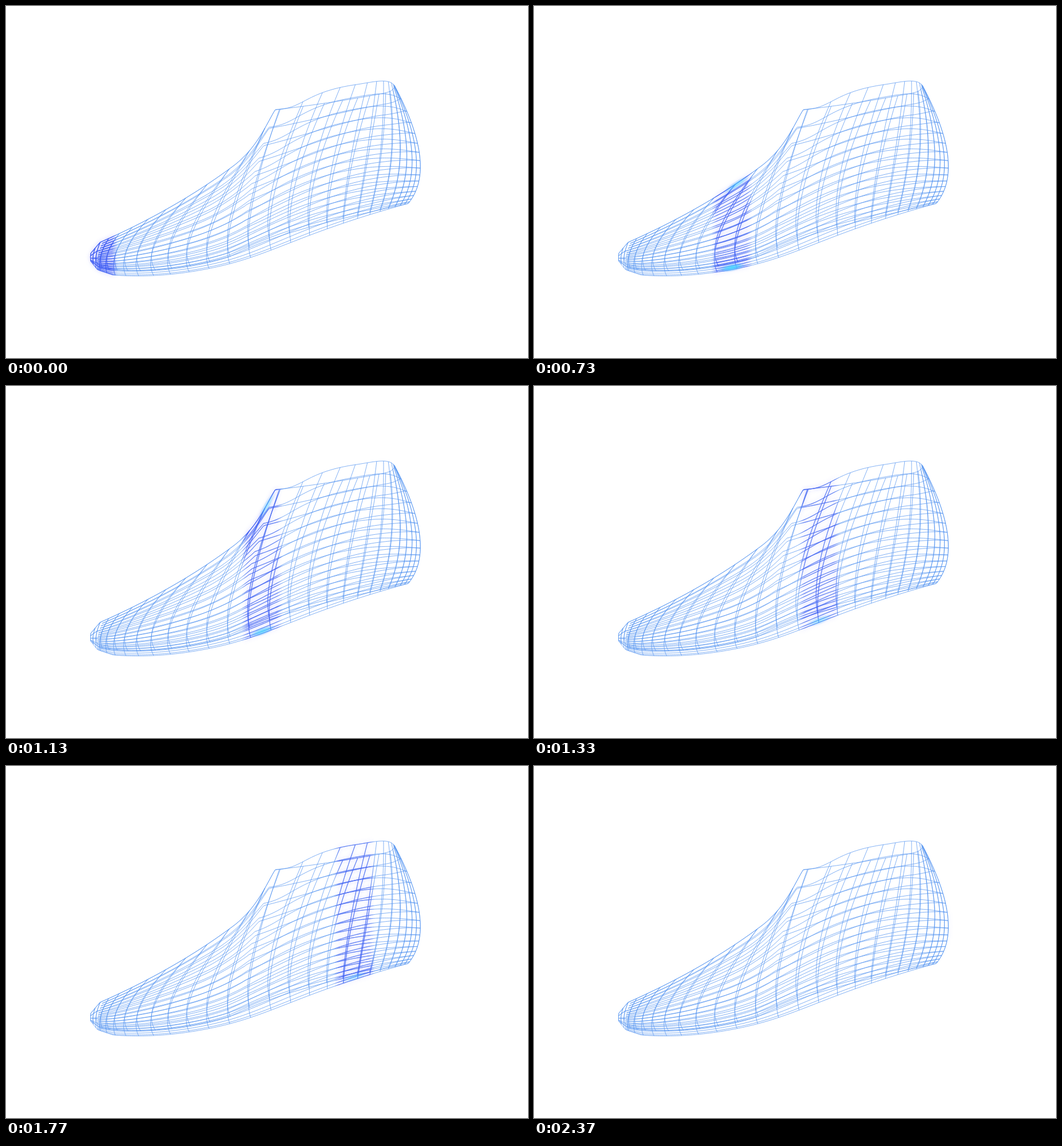
An HTML page with a canvas that plays this animation: 911 px wide and 615 px high, repeating every 2410 ms.

```html
<!DOCTYPE html>
<html lang="en">
<head>
<meta charset="utf-8">
<title>Foot scan</title>
<style>
  html, body { margin: 0; width: 100%; height: 100%; overflow: hidden; background: #fff; }
  canvas { display: block; }
</style>
</head>
<body>
<canvas id="stage" width="911" height="615"></canvas>
<script>
const W = 911, H = 615, LOOP = 2410, STEP = 100 / 3;
const RINGS = 26, LONGS = 16, COLS = 160;

const range = (n, f) => Array.from({ length: n + 1 }, (_, i) => f(i / n, i));

// Returns a function from a fraction of the path's length to its point
function guide(d) {
  const path = document.createElementNS('http://www.w3.org/2000/svg', 'path');
  path.setAttribute('d', d);
  const length = path.getTotalLength();
  return f => path.getPointAtLength(f * length);
}

// Each side is lofted between a sole edge and a rim, pulled towards a belly curve.
const instep = 'M148 432L164 413C250 375 330 330 400 277C440 245 455 205 470 181';
const near = {
  sole: guide('M148 446L160 461L187 470C260 476 330 465 380 453C470 431 520 395 702 345'),
  belly: guide('M147 439C230 430 320 420 370 400C450 368 560 230 754 282'),
  rim: guide(instep + 'C540 174 650 155 665 151C672 149 678 145 678 139')
};
const far = {
  sole: guide('M148 446L165 458C240 472 340 455 390 438C470 400 530 383 702 345'),
  belly: guide('M147 439C250 420 330 400 395 375C460 330 550 230 754 282'),
  rim: guide(instep + 'C520 180 520 150 613 137C640 133 668 125 678 139')
};

// Cross-section at f, from toe (0) to heel (1); rings lean forward along the instep
function section(side, f) {
  const a = side.sole(f), b = side.belly(f ** 1.25), c = side.rim(1 - (1 - f) ** 1.6);
  return v => ['x', 'y'].map(k => a[k] * (1 - v) ** 2 + 2 * b[k] * v * (1 - v) + c[k] * v * v);
}

// Rings crowd together at toe and heel, lengthwise lines at the sole
const ringAt = k => k - 0.7 * Math.sin(2 * Math.PI * k) / (2 * Math.PI);
const longAt = k => k ** 1.35;

function sideLines(side) {
  const cols = range(COLS, f => section(side, f));
  const rings = range(RINGS, k => range(28, section(side, ringAt(k))));
  const longs = range(LONGS, (k, j) =>
    cols.slice(j % 4 ? 5 : 0).map(col => col(longAt(k))));
  return [...rings, ...longs];
}

const lines = [near, far].flatMap(sideLines);

function layer(draw) {
  const c = document.createElement('canvas');
  c.width = W;
  c.height = H;
  const g = c.getContext('2d');
  if (draw) draw(g);
  return c;
}

function strokeMesh(g) {
  g.lineJoin = 'round';
  for (const line of lines) {
    g.beginPath();
    line.forEach(p => g.lineTo(p[0], p[1]));
    g.stroke();
  }
}

const mesh = layer(g => {
  g.strokeStyle = 'rgba(84,148,240,.82)';
  g.lineWidth = 0.9;
  strokeMesh(g);
});

const lit = layer(g => {
  g.strokeStyle = 'rgba(66,92,242,.62)';
  g.lineWidth = 1.15;
  g.shadowColor = 'rgba(80,75,255,.42)';
  g.shadowBlur = 8;
  strokeMesh(g);
});

const band = layer(), bg = band.getContext('2d');
const ctx = document.getElementById('stage').getContext('2d');
const soleEdge = range(100, near.sole);
const rimEdge = range(100, near.rim);

// Cyan gleam lying along an edge
function gleam(edge, x, rx, ry, lift, alpha) {
  const i = edge.findIndex(p => p.x > x);
  if (i < 1 || alpha <= 0) return;
  const a = edge[i - 1], b = edge[i];
  bg.save();
  bg.translate(x, b.y - lift);
  bg.rotate(Math.atan2(b.y - a.y, b.x - a.x));
  bg.scale(rx, ry);
  const fill = bg.createRadialGradient(0, 0, 0, 0, 0, 1);
  fill.addColorStop(0, `rgba(75,220,255,${alpha})`);
  fill.addColorStop(0.45, `rgba(75,200,255,${alpha * 0.75})`);
  fill.addColorStop(1, 'rgba(80,150,255,0)');
  bg.fillStyle = fill;
  bg.fillRect(-1, -1, 2, 2);
  bg.restore();
}

function render(t) {
  const k = Math.min(71, Math.floor((t + 3.4) / STEP));
  const left = 129 + k * STEP * 0.254, mid = left + 30;

  bg.globalCompositeOperation = 'source-over';
  bg.clearRect(0, 0, W, H);
  bg.drawImage(lit, 0, 0);
  const shine = Math.abs(Math.sin(Math.PI * (mid - 160) / 400));
  gleam(soleEdge, mid, 26, 7, 3, shine * Math.min(1, (702 - mid) / 30));
  gleam(rimEdge, mid + 8, 30, 6, -2, 0.6 * shine * Math.min(1, (470 - mid) / 20));

  const mask = bg.createLinearGradient(left - 6, 0, left + 66, 0);
  mask.addColorStop(0, 'rgba(0,0,0,0)');
  mask.addColorStop(0.14, '#000');
  mask.addColorStop(0.86, '#000');
  mask.addColorStop(1, 'rgba(0,0,0,0)');
  bg.globalCompositeOperation = 'destination-in';
  bg.fillStyle = mask;
  bg.fillRect(0, 0, W, H);

  ctx.fillStyle = '#fff';
  ctx.fillRect(0, 0, W, H);
  ctx.drawImage(mesh, 0, 0);
  ctx.drawImage(band, 0, 0);
}

const start = performance.now();
function tick() {
  render((performance.now() - start) % LOOP);
  requestAnimationFrame(tick);
}
render(0);
requestAnimationFrame(tick);
</script>
</body>
</html>
```
